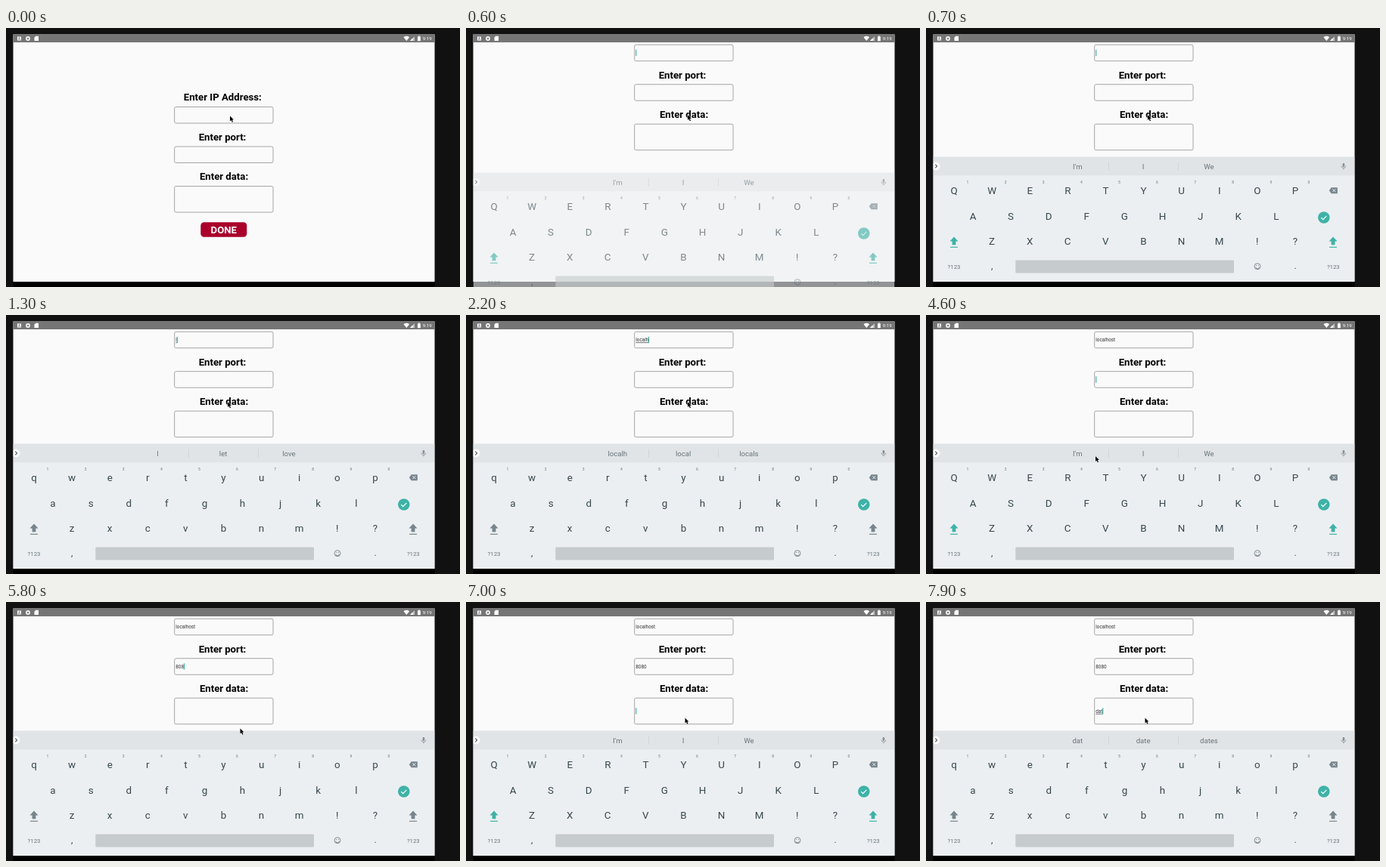
Write an HTML page with a canvas that moves like this. It is 600 by 343 pixels and loops after 8000 ms.

```html
<!DOCTYPE html>
<html lang="en">
<head>
<meta charset="utf-8">
<title>Form entry</title>
<style>
html, body { margin: 0; width: 100%; height: 100%; overflow: hidden; background: #111; }
canvas { display: block; width: 600px; height: 343px; }
</style>
</head>
<body>
<canvas id="stage"></canvas>
<script>
const LOOP = 8000, STEP = 100;
const TEAL = '#3fb2a7', INK = '#37474f', SOFT = '#66747c';
const canvas = document.getElementById('stage');
const ctx = canvas.getContext('2d');
const scale = window.devicePixelRatio || 1;
canvas.width = 600 * scale;
canvas.height = 343 * scale;

// Each entry: time, field, value, suggestions
const entries = [
  [300, 0, '', "I'm,I,We"],
  [1200, 0, 'l', 'l,let,love'],
  [1700, 0, 'lo', 'lo,love,look'],
  [1800, 0, 'loc', 'loc,lock,location'],
  [1900, 0, 'loca', 'loca,local,location'],
  [2100, 0, 'local', 'local,locally,locals'],
  [2200, 0, 'localh', 'localh,local,locals'],
  [2400, 0, 'localho', 'localho,local,locals'],
  [2500, 0, 'localhos', 'localhos,local,locals'],
  [2600, 0, 'localhost', 'localhost,localhos,'],
  [3600, 1, '', "I'm,I,We"],
  [5300, 1, '8', ''],
  [5400, 1, '80', ''],
  [5500, 1, '808', ''],
  [6200, 1, '8080', ''],
  [7000, 2, '', "I'm,I,We"],
  [7700, 2, 'd', 'd,do,did'],
  [7800, 2, 'da', 'da,day,days'],
  [7900, 2, 'dat', 'dat,date,dates']
];

// Each stop: time, x, y
const pointerPath = [
  [100, 296, 116.5], [300, 293, 115], [2800, 293, 115], [3500, 288, 85.5],
  [3700, 288, 85.5], [4500, 224, 187], [4600, 224, 187], [5100, 309.5, 167.5],
  [6700, 309.5, 167.5], [7000, 289.5, 153.5]
];

const fields = [
  { label: 'Enter IP Address:', y: 104.5, h: 21.5 },
  { label: 'Enter port:', y: 157, h: 21.5 },
  { label: 'Enter data:', y: 209.5, h: 34.5 }
];

function rect(x, y, w, h, fill) {
  ctx.fillStyle = fill;
  ctx.fillRect(x, y, w, h);
}

function roundBox(x, y, w, h, r) {
  ctx.beginPath();
  ctx.roundRect(x, y, w, h, r);
}

function disc(x, y, r, fill) {
  ctx.beginPath();
  ctx.arc(x, y, r, 0, Math.PI * 2);
  ctx.fillStyle = fill;
  ctx.fill();
}

function poly(points, fill) {
  ctx.beginPath();
  points.forEach(([x, y]) => ctx.lineTo(x, y));
  ctx.closePath();
  ctx.fillStyle = fill;
  ctx.fill();
}

function line(points, color, width) {
  ctx.beginPath();
  points.forEach(([x, y]) => ctx.lineTo(x, y));
  ctx.strokeStyle = color;
  ctx.lineWidth = width;
  ctx.stroke();
}

function text(str, x, y, size, color, weight = 400, align = 'center') {
  ctx.font = `${weight} ${size}px Roboto, sans-serif`;
  ctx.textAlign = align;
  ctx.fillStyle = color;
  ctx.fillText(str, x, y);
}

function drawStatusBar() {
  rect(9.5, 8.5, 557, 10.5, '#757575');
  rect(15, 11.5, 5, 5, '#fff');
  text('A', 17.5, 16, 4.5, '#757575', 700);
  disc(29, 14, 2.9, '#fff');
  disc(29, 14, 1.5, '#8c8c8c');
  poly([[37.5, 12.5], [39.3, 10.8], [43, 10.8], [43, 17], [37.5, 17]], '#fff');
  ctx.beginPath();
  ctx.moveTo(529.3, 17);
  ctx.lineTo(525.5, 12.2);
  ctx.quadraticCurveTo(529.3, 9.3, 533.1, 12.2);
  ctx.fillStyle = '#fff';
  ctx.fill();
  poly([[534, 17], [540, 11], [540, 17]], '#c4c4c4');
  poly([[534, 17], [537.5, 13.5], [537.5, 17]], '#fff');
  rect(544, 11.3, 3.8, 5.9, '#fff');
  rect(545, 10.5, 1.8, 1, '#fff');
  text('9:19', 556.7, 16.2, 6.2, '#fff');
}

function drawField(field, i, values, state, now) {
  const mid = field.y + field.h / 2;
  text(field.label, i ? (i === 1 ? 286 : 288) : 286.3, field.y - 8.2, 13.2, '#000', 700);
  roundBox(222.7, field.y, 130.3, field.h, 2);
  ctx.fillStyle = '#fafafa';
  ctx.fill();
  ctx.strokeStyle = '#a6a6a6';
  ctx.lineWidth = 1;
  ctx.stroke();

  const value = values[i];
  text(value, 224.3, mid + 2.3, 6.3, '#333', 400, 'left');
  if (!state || state[1] !== i) return;
  const width = ctx.measureText(value).width;
  if (i !== 1 && value) rect(224.3, mid + 3.4, width, 0.7, '#444');
  const caretOn = Math.floor((now - state[0]) / 500) % 2 === 0;
  if (caretOn) rect(224.3 + width, mid - 4.2, 1, 8.4, '#26a69a');
}

function drawPage(values, state, now, panned) {
  rect(9.5, 8.5, 557, 327.5, '#fafafa');
  ctx.save();
  ctx.beginPath();
  ctx.rect(9.5, 19, 557, 317);
  ctx.clip();
  if (panned) ctx.translate(0, -82.3);
  fields.forEach((field, i) => drawField(field, i, values, state, now));
  if (!panned) {
    roundBox(257.3, 257.3, 61, 19.4, 4.5);
    ctx.fillStyle = '#a9022b';
    ctx.fill();
    text('DONE', 287.8, 271.5, 13.2, '#fff', 700);
  }
  ctx.restore();
}

function drawShift(x, color) {
  poly([[x, 276.5], [x + 5.5, 282.5], [x + 2.4, 282.5], [x + 2.4, 287.2],
    [x - 2.4, 287.2], [x - 2.4, 282.5], [x - 5.5, 282.5]], color);
  rect(x - 5, 289.7, 10, 1.2, color);
}

function drawSuggestions(list) {
  rect(9.5, 170.5, 557, 25, '#e1e4e6');
  if (list) {
    list.split(',').forEach((word, i) => text(word, 200.3 + 86.8 * i, 186.7, 9.6, SOFT));
    rect(241, 177.5, 0.8, 11.5, '#ced3d6');
    rect(333, 177.5, 0.8, 11.5, '#ced3d6');
  }
  ctx.save();
  ctx.beginPath();
  ctx.rect(9.5, 170, 20, 26);
  ctx.clip();
  disc(13, 183, 5.3, '#fff');
  ctx.restore();
  line([[12.3, 180.7], [14.5, 183], [12.3, 185.3]], '#455a64', 1.1);
  roundBox(550.6, 179, 2.6, 5, 1.3);
  ctx.fillStyle = '#84919a';
  ctx.fill();
  ctx.beginPath();
  ctx.arc(551.9, 182.6, 2.9, 0, Math.PI);
  ctx.strokeStyle = '#84919a';
  ctx.lineWidth = 0.8;
  ctx.stroke();
  rect(551.5, 185.5, 0.8, 2, '#84919a');
}

function drawIcons(upper) {
  poly([[532.8, 215.2], [535.7, 211.2], [543.8, 211.2], [543.8, 219.2], [535.7, 219.2]], '#77858d');
  line([[537.3, 213.2], [541.3, 217.2]], '#eceff1', 1);
  line([[541.3, 213.2], [537.3, 217.2]], '#eceff1', 1);
  disc(525.8, 251, 7.8, TEAL);
  line([[522.3, 251.2], [524.7, 253.6], [529.3, 248.8]], '#fff', 1.2);
  [37, 538].forEach(x => drawShift(x, upper ? TEAL : '#77858d'));

  ctx.beginPath();
  ctx.arc(438, 315.7, 4, 0, Math.PI * 2);
  ctx.moveTo(440.2, 316.7);
  ctx.arc(438, 316.7, 2.2, 0, Math.PI);
  ctx.strokeStyle = SOFT;
  ctx.lineWidth = 0.8;
  ctx.stroke();
  disc(436.6, 314.5, 0.6, SOFT);
  disc(439.4, 314.5, 0.6, SOFT);
}

function drawKeyboard(suggestions, upper, now) {
  const left = Math.max(0, 1 - (now - 600) / 100);
  ctx.save();
  ctx.globalAlpha = 1 - 0.38 * left;
  ctx.beginPath();
  ctx.rect(9.5, 19, 557, left ? 324 : 317);
  ctx.clip();
  ctx.translate(0, 21 * left);
  rect(9.5, 195.5, 557, 140.5, '#eceff1');
  drawSuggestions(suggestions);
  ['qwertyuiop', 'asdfghjkl', 'zxcvbnm!?'].forEach((row, r) => {
    [...row].forEach((key, i) => {
      const x = 37 + 25 * r + 50.1 * i;
      text(upper ? key.toUpperCase() : key, x, 220.2 + 33.6 * r, 13.4, INK);
      if (r === 0) text((i + 1) % 10, x + 18, 206, 5, SOFT);
    });
  });
  drawIcons(upper);
  text('?123', 37, 318.7, 7.8, SOFT);
  text('?123', 538.3, 318.7, 7.8, SOFT);
  text(',', 87.3, 319.3, 12, INK);
  text('.', 488, 319.3, 12, INK);
  roundBox(118.3, 307.5, 288.7, 17, 1);
  ctx.fillStyle = '#c6cbce';
  ctx.fill();
  ctx.restore();
}

function pointerAt(now) {
  const next = pointerPath.findIndex(stop => stop[0] > now);
  if (next === 0) return pointerPath[0].slice(1);
  if (next < 0) return pointerPath.at(-1).slice(1);
  const [t0, x0, y0] = pointerPath[next - 1];
  const [t1, x1, y1] = pointerPath[next];
  const p = (now - t0) / (t1 - t0);
  const ease = p * p * (3 - 2 * p);
  return [x0 + (x1 - x0) * ease, y0 + (y1 - y0) * ease];
}

function drawPointer([x, y]) {
  const shape = [[0, 0], [0, 7], [1.6, 5.6], [2.8, 8.2], [4, 7.7], [2.9, 5.1], [5, 5.1]]
    .map(([dx, dy]) => [x + dx, y + dy]);
  line([...shape, shape[0]], '#fff', 0.9);
  poly(shape, '#000');
}

function draw(now) {
  const past = entries.filter(entry => entry[0] <= now);
  const state = past.at(-1);
  const values = ['', '', ''];
  past.forEach(([, field, value]) => { values[field] = value; });
  const open = now >= 600;

  ctx.setTransform(scale, 0, 0, scale, 0, 0);
  rect(0, 0, 600, 343, '#111');
  rect(9.5, 336, 557, 7, '#000');
  drawPage(values, state, now, open);
  drawStatusBar();
  if (open) drawKeyboard(state[3], state[2] === '', now);
  drawPointer(pointerAt(now));
}

const start = performance.now();
function tick() {
  const elapsed = (performance.now() - start) % LOOP;
  draw(Math.floor(elapsed / STEP) * STEP);
  requestAnimationFrame(tick);
}
tick();
</script>
</body>
</html>
```
